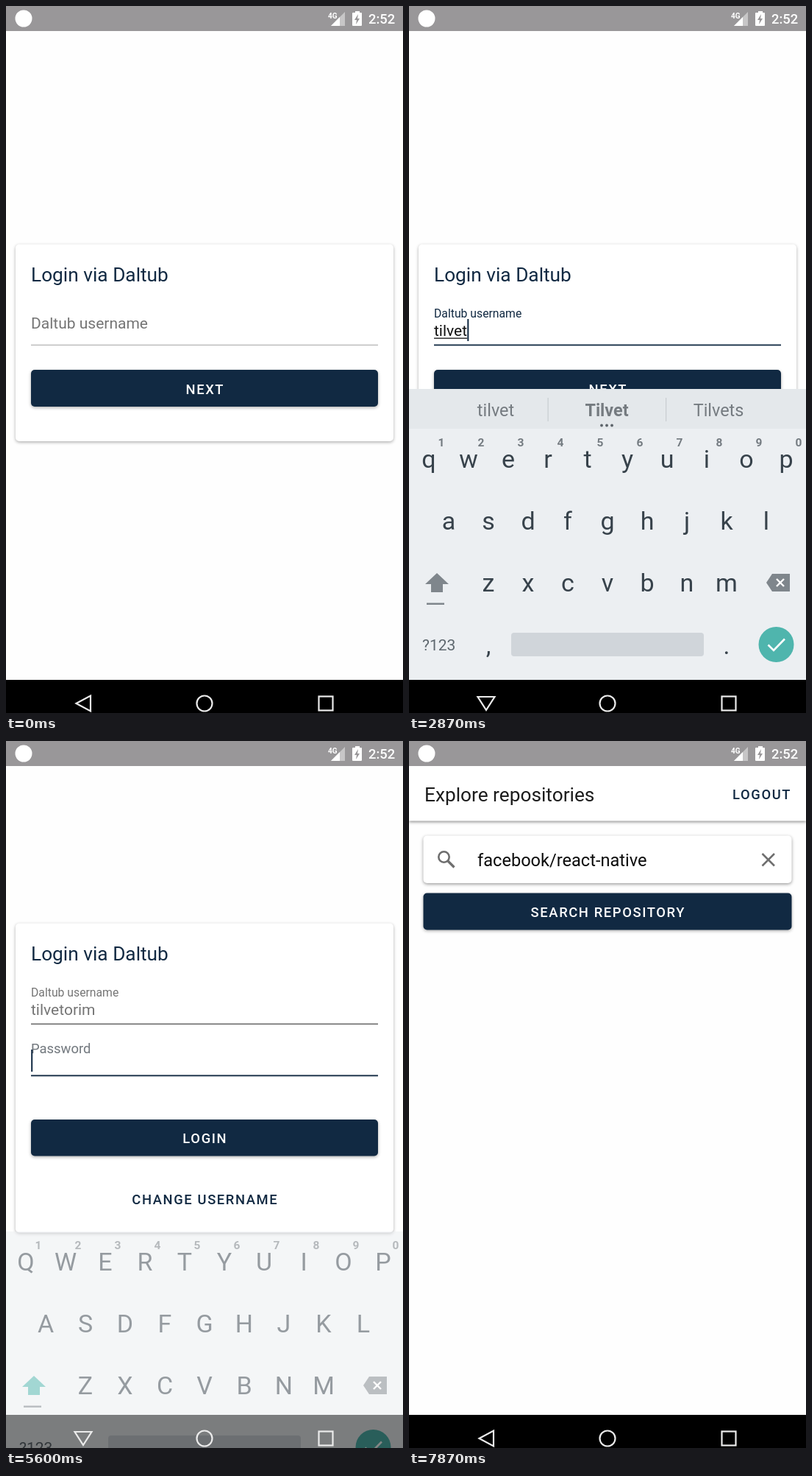
Animation of 540x960 px, one loop 8 s. Source, as an HTML page with a canvas:

```html
<!DOCTYPE html>
<html lang="en">
<head>
<meta charset="utf-8">
<title>Login flow</title>
<style>
html, body { margin: 0; width: 100%; height: 100%; overflow: hidden; background: #fff; }
canvas { display: block; width: 540px; height: 960px; }
</style>
</head>
<body>
<canvas id="stage" width="540" height="960"></canvas>
<script>
const LOOP = 8000;
const NAVY = '#112942', GREY = '#757575', TEAL = '#4fb5ad', KEY = '#37424b';
const SITE = 'Daltub', USER = 'tilvetorim';

const stage = document.getElementById('stage').getContext('2d');
const layer = document.createElement('canvas');
layer.width = 540;
layer.height = 960;
const keys = layer.getContext('2d');
let c = stage;

const clamp = v => Math.max(0, Math.min(1, v));
const ramp = (t, a, b) => clamp((t - a) / (b - a));
const smooth = p => p * p * (3 - 2 * p);
const mix = (a, b, p) => a + (b - a) * p;

// y is the middle of the capital letters
function text(s, x, y, size, color, { weight = 400, align = 'left', gap = 0 } = {}) {
  c.font = `${weight} ${size}px Roboto, sans-serif`;
  c.letterSpacing = gap + 'px';
  c.textAlign = align;
  c.fillStyle = color;
  c.fillText(s, x + (align === 'center' ? gap / 2 : 0), y + size * 0.355);
  return c.measureText(s).width;
}

function rect(x, y, w, h, color) {
  c.fillStyle = color;
  c.fillRect(x, y, w, h);
}

function round(x, y, w, h, r, color) {
  c.beginPath();
  c.roundRect(x, y, w, h, r);
  c.fillStyle = color;
  c.fill();
}

function disc(x, y, r, color) {
  c.beginPath();
  c.arc(x, y, r, 0, Math.PI * 2);
  c.fillStyle = color;
  c.fill();
}

function path(points, { fill, stroke, width = 2, close = true }) {
  c.beginPath();
  points.forEach(([x, y]) => c.lineTo(x, y));
  if (close) c.closePath();
  if (fill) { c.fillStyle = fill; c.fill(); }
  if (stroke) { c.strokeStyle = stroke; c.lineWidth = width; c.stroke(); }
}

function raised(x, y, w, h, r, color, alpha = 0.32) {
  c.save();
  c.shadowColor = `rgba(0,0,0,${alpha})`;
  c.shadowBlur = 4;
  c.shadowOffsetY = 1.5;
  round(x, y, w, h, r, color);
  c.restore();
}

function button(label, x, y, w, h, press) {
  raised(x, y, w, h, 5, NAVY);
  if (press && press.alpha > 0) {
    c.save();
    c.beginPath();
    c.roundRect(x, y, w, h, 5);
    c.clip();
    rect(x, y, w, h, `rgba(255,255,255,${0.14 * press.alpha})`);
    disc(press.x, press.y, press.r, `rgba(255,255,255,${0.1 * press.alpha})`);
    c.restore();
  }
  text(label, x + w / 2, y + h / 2 + 1, 18.4, '#fff', { weight: 500, align: 'center', gap: 1.6 });
}

function ripple(t, start, x, y) {
  const dt = t - start;
  if (dt < 0 || dt > 560) return null;
  return { x, y, r: 250 * (dt / 400) ** 2, alpha: ramp(dt, 0, 70) * (1 - ramp(dt, 360, 560)) };
}

function statusBar() {
  rect(0, 0, 540, 34, '#999799');
  disc(24, 17, 11.5, '#fff');
  text('4G', 438, 13, 10, '#fff', { weight: 700 });
  path([[461, 8], [461, 27], [442, 27]], { fill: 'rgba(255,255,255,.45)' });
  path([[454, 15], [454, 27], [442, 27]], { fill: '#fff' });
  rect(475, 7, 6, 3, '#fff');
  round(471, 9, 13, 18, 1, '#fff');
  path([[479, 11], [474, 19], [477, 19], [476, 25], [481, 17], [478, 17]], { fill: '#999799' });
  text('2:52', 493, 17.5, 18.4, '#fff', { weight: 500 });
}

function navIcons(down) {
  const ink = { stroke: '#ebebeb', width: 2.2 };
  path(down ? [[93.5, 938], [116.5, 938], [105, 956]] : [[95.5, 947], [115, 936.5], [115, 957.5]], ink);
  c.beginPath();
  c.arc(270, 947, 10.5, 0, Math.PI * 2);
  c.stroke();
  c.strokeRect(425.5, 937.5, 19, 19);
}

// raise: 0 = label resting as a placeholder, 1 = floated
function field(line, label, { raise = 0, focus = 0, off = false, value = '', dots = 0, mark = false, caret = false, show = 1 }) {
  if (focus > 0.5) rect(34, line - 0.5, 472, 1.8, NAVY);
  else if (off) rect(34, line - 0.5, 472, 1.6, '#6c6c6c');
  else rect(34, line - 0.3, 472, 1.4, '#b9b9b9');

  const y = line - mix(29.5, 43, raise), size = mix(21, 15.75, raise);
  for (const [color, a] of [[GREY, 1 - focus], [NAVY, focus]]) {
    c.globalAlpha = a * show;
    if (a * show > 0) text(label, 34, y, size, color);
  }
  c.globalAlpha = 1;

  let end = 34;
  if (value) {
    const ink = off ? GREY : '#111';
    const w = text(value, 34, line - 19, 21, ink);
    if (mark) rect(34, line - 9.5, w, 1.3, ink);
    end += w;
  }
  for (let i = 0; i < dots; i++) disc(38 + 7 * i, line - 19, 2.7, '#111');
  if (dots) end += 7 * dots;
  if (caret) rect(end + 0.2, line - 35, 2, 30, NAVY);
}

function backspace() {
  path([[486, 783], [494, 771], [518, 771], [518, 795], [494, 795]], { fill: '#7f868c' });
  path([[500, 778], [510, 788]], { stroke: '#fff', width: 2.4, close: false });
  path([[510, 778], [500, 788]], { stroke: '#fff', width: 2.4, close: false });
}

function hints(n) {
  rect(0, 520, 540, 54, '#e4e8eb');
  rect(188.5, 532, 1.2, 32, '#c8cdd1');
  rect(349, 532, 1.2, 32, '#c8cdd1');
  if (!n) return;
  const part = USER.slice(0, n), cap = part[0].toUpperCase() + part.slice(1);
  const words = n < USER.length ? [part, cap, cap + 's'] : ['tilor Torim', 'Tilor Torim', 'Tilor Torib'];
  words.forEach((w, i) => text(w, [118, 269, 421][i], 548.5, 23.4, '#757b80',
    { align: 'center', weight: i === 1 ? 700 : 400 }));
  for (const x of [262, 269, 276]) disc(x, 569.5, 1.9, '#5d646a');
}

function keyboard(upper, bar, typed) {
  rect(0, 574, 540, 341, '#eceff2');
  if (bar) hints(typed);
  [['qwertyuiop', 27], ['asdfghjkl', 54], ['zxcvbnm', 108]].forEach(([row, x0], r) => {
    [...row].forEach((ch, i) => {
      const x = x0 + 54 * i;
      text(upper ? ch.toUpperCase() : ch, x, 615 + 84 * r, 34, KEY, { align: 'center' });
      if (!r) text(String((i + 1) % 10), x + 17, 592, 15.5, '#747b81', { align: 'center', weight: 700 });
    });
  });
  const shift = upper ? TEAL : '#7f868c';
  path([[38, 770], [54, 785], [46, 785], [46, 796], [30, 796], [30, 785], [22, 785]], { fill: shift });
  rect(24, 810.5, 24, 2.5, '#7f868c');
  backspace();
  text('?123', 18, 867.5, 21, '#5f686f');
  text(',', 108, 867.5, 34, KEY, { align: 'center' });
  text('.', 432, 867.5, 34, KEY, { align: 'center' });
  round(139, 851, 262, 32, 4, '#d0d5da');
  disc(499.5, 867, 24, TEAL);
  path([[488.5, 867.5], [496, 875], [511, 859.5]], { stroke: '#fff', width: 2.6, close: false });
}

// Keyboard window: slides and fades in fast-to-slow, leaves slow-to-fast
function panel(t, enter, leave) {
  if (t < enter || t > leave + 150) return null;
  const away = (1 - ramp(t, enter, enter + 300)) ** 5;
  const gone = ramp(t, leave, leave + 150) ** 5;
  return { dy: 192 * away + 46 * gone, alpha: (1 - away) * (1 - gone), down: t < leave };
}

function showPanel(p, upper, bar, typed) {
  c = keys;
  c.clearRect(0, 0, 540, 960);
  keyboard(upper, bar, typed);
  c = stage;
  c.globalAlpha = p.alpha;
  c.drawImage(layer, 0, Math.round(p.dy));
  c.globalAlpha = 1;
}

const blink = (t, from) => t >= from && Math.floor((t - from) / 500) % 2 === 0;

function typedCount(t) {
  return t < 2070 ? 0 : Math.min(USER.length, 1 + Math.floor((t - 2070) / 140));
}

function dotCount(t) {
  if (t < 5730) return 0;
  return t < 6270 ? Math.min(11, 1 + Math.floor((t - 5730) / 32)) : 12;
}

function userStep(t) {
  const n = typedCount(t), p = smooth(ramp(t, 1200, 1350));
  raised(13, 323.5, 514, 267.5, 5, '#fff');
  text('Login via ' + SITE, 34, 364.5, 26.25, NAVY);
  field(460, SITE + ' username', {
    raise: p, focus: p, value: USER.slice(0, n), mark: true,
    caret: n ? t < 3330 || blink(t, 3330) : blink(t, 930)
  });
  button('NEXT', 34, 494, 472, 50, ripple(t, 3960, 241, 502));
}

function passStep(t) {
  const p = smooth(ramp(t, 5525, 5680)), blur = ramp(t, 7000, 7150);
  const n = dotCount(t);
  raised(13, 247.5, 514, 420, 5, '#fff');
  text('Login via ' + SITE, 34, 288.5, 26.25, NAVY);
  field(384, SITE + ' username', { raise: 1, off: true, value: USER, mark: t < 4730 });
  // the line turns dark on focus, the label only as it settles
  const focus = t < 5525 ? 0 : Math.max(0, p * p - blur);
  field(454, 'Password', {
    raise: p, focus, dots: n, show: ramp(t, 4840, 5000),
    caret: t < 7000 && (n ? t < 6270 || blink(t, 6270) : blink(t, 5470))
  });
  if (t > 5525 && t < 7000) rect(34, 453.5, 472, 1.8, NAVY);
  button('LOGIN', 34, 514, 472, 49.5, ripple(t, 6660, 270, 540));
  text('CHANGE USERNAME', 270, 622, 18.4, NAVY, { weight: 500, align: 'center', gap: 1.6 });
}

function explore() {
  raised(0, 34, 540, 74.5, 0, '#fff', 0.45);
  text('Explore repositories', 21, 72.5, 26.25, '#1c1c1c');
  text('LOGOUT', 440, 72.5, 18.4, NAVY, { weight: 500, gap: 1.6 });
  raised(19.5, 128.5, 501, 64.5, 5, '#fff', 0.4);
  c.strokeStyle = '#6e6e6e';
  c.lineWidth = 2.6;
  c.beginPath();
  c.arc(47.5, 157.5, 7.2, 0, Math.PI * 2);
  c.stroke();
  path([[52.5, 162.5], [61.5, 171.5]], { stroke: '#6e6e6e', width: 3.2, close: false });
  text('facebook/react-native', 93, 161.5, 23.6, '#0c0c0c');
  path([[480.5, 153], [497, 169.5]], { stroke: '#6e6e6e', width: 2.5, close: false });
  path([[497, 153], [480.5, 169.5]], { stroke: '#6e6e6e', width: 2.5, close: false });
  button('SEARCH REPOSITORY', 19.5, 206.5, 501, 50, null);
}

function draw(t) {
  c = stage;
  rect(0, 0, 540, 960, '#fefefe');
  if (t < 4530) userStep(t);
  else if (t < 7670) passStep(t);
  else explore();
  statusBar();
  rect(0, 915, 540, 45, '#000');

  const first = panel(t, 1320, 4544), second = panel(t, 5560, 7000);
  if (first) showPanel(first, t < 2070, true, typedCount(t));
  if (second) showPanel(second, t < 5730, false, 0);
  const shown = first || second;
  navIcons(shown && shown.down);
}

function tick() {
  draw(performance.now() % LOOP);
  requestAnimationFrame(tick);
}
tick();
</script>
</body>
</html>
```
